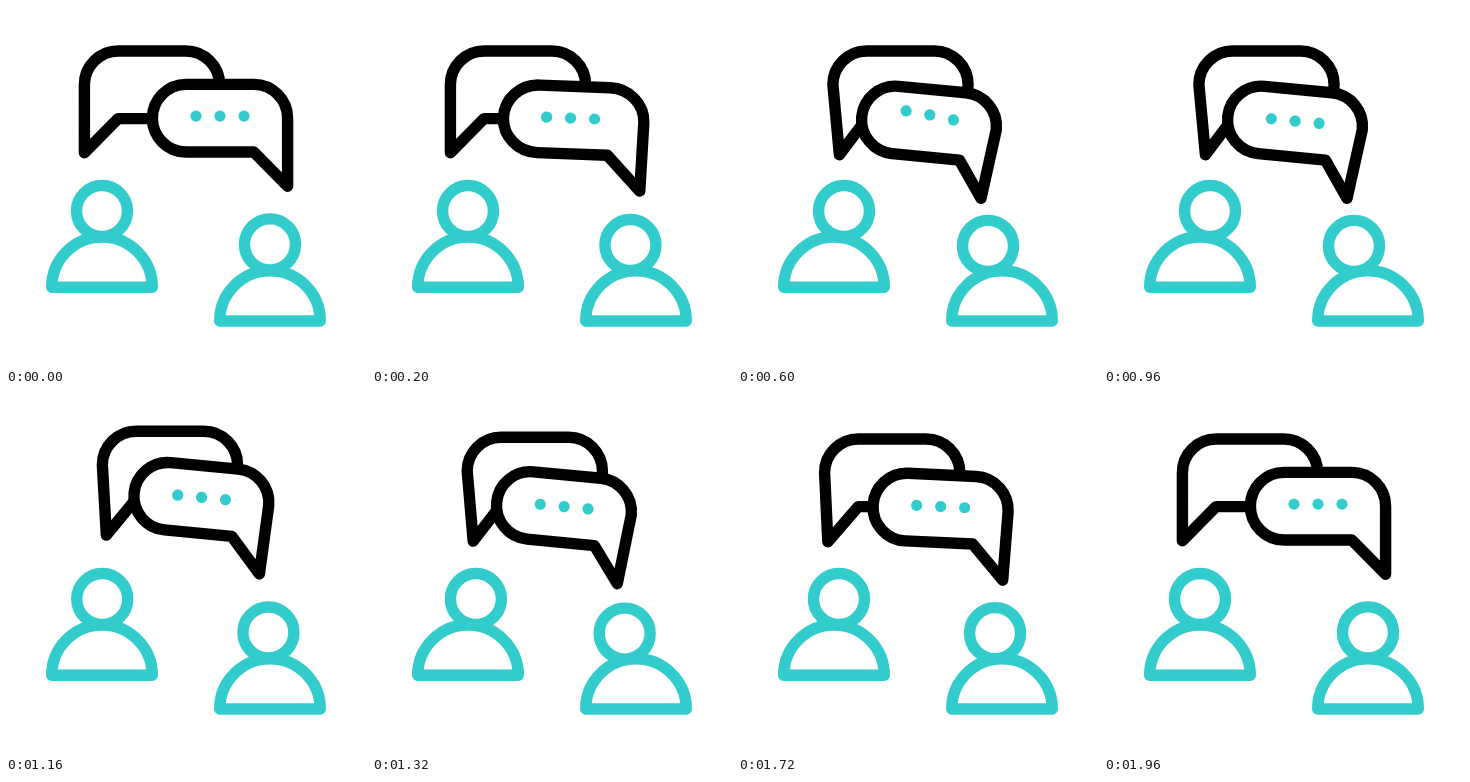
Write an HTML page with a canvas that moves like this. It is 360 px wide and 360 px high and loops after 2000 ms.

```html
<!DOCTYPE html>
<html lang="en">
<head>
<meta charset="utf-8">
<title>Conversation</title>
<style>
  html, body { margin: 0; width: 100%; height: 100%; overflow: hidden; background: #fff; }
  canvas { display: block; width: 360px; height: 360px; }
</style>
</head>
<body>
<canvas id="stage"></canvas>
<script>
const SIZE = 360, LOOP = 2000, LINE = 11.4;
const TEAL = '#33cccc', BLACK = '#000';
const canvas = document.getElementById('stage');
const ctx = canvas.getContext('2d');
const dpr = window.devicePixelRatio || 1;
canvas.width = canvas.height = SIZE * dpr;

const mix = (a, b, k) => a + (b - a) * k;

// Smooth rise from 0 to 1 between two times
function ramp(t, start, end) {
  const u = Math.min(1, Math.max(0, (t - start) / (end - start)));
  return u * u * (3 - 2 * u);
}

// Lean in, stay, and settle back together
const lean = (t, start, end) => ramp(t, start, end) - ramp(t, 1480, 1960);
const hopAt = t => ramp(t, 980, 1180) - ramp(t, 1180, 1380);

// Run the drawing in a moved and turned frame
function within(x, y, deg, paint) {
  ctx.save();
  ctx.translate(x, y);
  ctx.rotate(deg * Math.PI / 180);
  paint();
  ctx.restore();
}

// dir 1 has its tail on the right, -1 on the left
function bubble(x, y, deg, dir, stretch, tailX, tailY) {
  const r = 33.8, w = 2 * r;
  within(x, y, deg, () => {
    ctx.scale(dir * stretch, 1);
    ctx.beginPath();
    ctx.moveTo(w + tailX, 68 + tailY);
    ctx.lineTo(w, 0);
    ctx.arc(r, 0, r, 0, -Math.PI / 2, true);
    ctx.arc(-r, 0, r, -Math.PI / 2, Math.PI / 2, true);
    ctx.lineTo(r, r);
    ctx.closePath();
  });
  ctx.fillStyle = '#fff';
  ctx.fill();
  ctx.strokeStyle = BLACK;
  ctx.stroke();
}

function person(x, y, headX, headY) {
  ctx.strokeStyle = TEAL;
  ctx.beginPath();
  ctx.arc(x, y, 50.3, Math.PI, 0);
  ctx.closePath();
  ctx.stroke();
  ctx.beginPath();
  ctx.arc(headX, headY, 25.5, 0, Math.PI * 2);
  ctx.stroke();
}

function typing(x, y, deg, t) {
  within(x, y, deg, () => {
    ctx.fillStyle = TEAL;
    for (let i = 0; i < 3; i++) {
      const start = 420 + 45 * i;
      const lift = 8.2 * (ramp(t, start, start + 200) - ramp(t, start + 200, start + 400));
      ctx.beginPath();
      ctx.arc((i - 1) * 24, -lift, 5.6, 0, Math.PI * 2);
      ctx.fill();
    }
  });
}

function leftSide(t, hop) {
  const k = lean(t, 240, 520);
  const tail = k * (1 - 0.4 * hop);
  person(96, 281.3, 96 + 10 * k * (1 - hop), 205);
  bubble(146 + 16.5 * k + 1.5 * hop, 78.8 - 8 * hop, 0, -1, 1, -6.5 * tail, 2 * k);
}

function rightSide(t, hop) {
  // The near end of the bubble arrives before the far end
  const lead = lean(t, 80, 275), lag = lean(t, 80, 360);
  const headLean = lag * (1 - 0.91 * hop);
  const tail = lag * lag * (1 - 0.7 * hop);
  const shift = 4.5 * hop;
  const y = mix(112.2, 117.2, lag) - 12 * hop;
  const deg = 5.5 * lag;
  const stretch = 1 + (lead - lag) * 0.14;

  person(264, 315, 264 - 14 * headLean, 238.4 + 1.5 * headLean);
  bubble(mix(214, 191, (lead + lag) / 2) + shift, y, deg, 1, stretch, -8.6 * tail, 1.8 * tail);
  typing(mix(214, 191.2, lead) + shift, y - 2.1, deg, t);
}

function draw(t) {
  ctx.setTransform(dpr, 0, 0, dpr, 0, 0);
  ctx.fillStyle = '#fff';
  ctx.fillRect(0, 0, SIZE, SIZE);
  ctx.lineWidth = LINE;
  ctx.lineJoin = ctx.lineCap = 'round';
  const hop = hopAt(t);
  leftSide(t, hop);
  rightSide(t, hop);
}

const begin = performance.now();
function tick() {
  draw((performance.now() - begin) % LOOP);
  requestAnimationFrame(tick);
}
tick();
</script>
</body>
</html>
```
